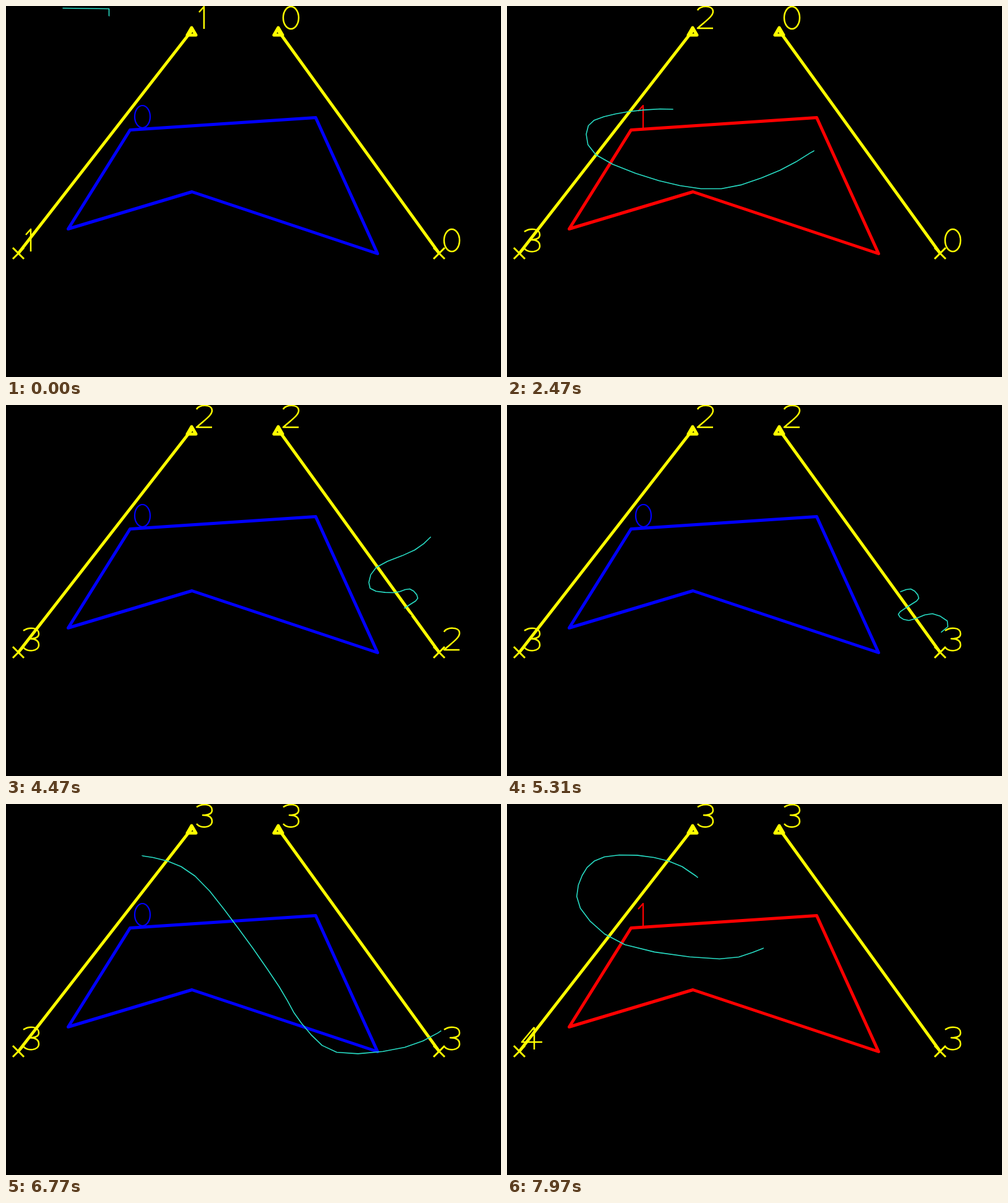
An HTML page with a canvas that plays this animation: 800 px wide and 600 px high, repeating every 8000 ms.

```html
<!DOCTYPE html>
<html lang="en">
<head>
<meta charset="utf-8">
<title>Zone and line counting</title>
<style>
  html, body { margin: 0; width: 100%; height: 100%; overflow: hidden; background: #000; }
  canvas { display: block; width: 800px; height: 600px; }
</style>
</head>
<body>
<canvas id="stage" width="800" height="600"></canvas>
<script>
const ctx = document.getElementById('stage').getContext('2d');
const LOOP = 8000, TRAIL = 1470, STEP = 70, BEAT = 210;
const YELLOW = '#ff0', TEAL = '#28dcc4';

// Stroked digits, relative to the marker they belong to.
const DIGITS = [
  'M8-21a12.5 18 0 1 1 25 0a12.5 18 0 1 1-25 0',
  'M12-30L20-39V-3',
  'M8-33C11-41 33-42 33-31C33-23 20-15 8-4H33',
  'M8-35C16-41 33-41 33-30Q33-22 18-22Q33-22 33-12C33-1 14 0 8-8',
  'M24-39V-3M24-39L4-15H37'
].map(d => new Path2D(d));

const zone = new Path2D('M200 200L500 180 600 400 300 300 100 360Z');
const arrow = new Path2D('M0 0V16L4 12 7 18 9 17 6 12H12Z');
const triangle = new Path2D('M0-5L-7 7H7Z');
const cross = new Path2D('M-9-9L9 9M9-9L-9 9');

const lines = [
  { from: [300, 40], to: [20, 400], initial: 1 },
  { from: [440, 40], to: [700, 400], initial: 0 }
];

// Key points of the walk, one per beat, joined by a smooth curve.
const walk = `166 17, 164 69, 246 104, 322 127, 333 167, 247 166, 175 174, 131 193, 143 240, 245 282,
  346 295, 441 265, 518 224, 636 199, 687 206, 660 234, 598 262, 588 296, 626 303, 652 297,
  665 312, 648 325, 632 338, 649 348, 687 337, 712 358, 644 393, 534 401, 477 354, 441 295,
  376 202, 305 116, 237 86, 157 85, 121 115, 118 168, 190 227, 343 250, 419 231, 495 205`
  .split(',').map(p => p.trim().split(' ').map(Number));

function position(t) {
  const i = Math.floor(t / BEAT), u = t / BEAT - i;
  const [a, b, c, d] = [-1, 0, 1, 2].map(k => walk[Math.min(Math.max(i + k, 0), walk.length - 1)]);
  return [0, 1].map(n => b[n] + u * ((c[n] - a[n]) +
    u * (2 * a[n] - 5 * b[n] + 4 * c[n] - d[n] + u * (3 * (b[n] - c[n]) + d[n] - a[n]))) / 2);
}

function isRightOf({ from, to }, [x, y]) {
  return x > from[0] + (to[0] - from[0]) * (y - from[1]) / (to[1] - from[1]);
}

for (const line of lines) {
  line.events = [];
  let side = isRightOf(line, position(0));
  for (let t = 10; t < LOOP; t += 10) {
    const now = isRightOf(line, position(t));
    if (now !== side) line.events.push({ t, right: now });
    side = now;
  }
}

function count(line, right, t) {
  return line.initial + line.events.filter(e => e.right === right && e.t <= t).length;
}

function stroke(path, color, width, [x, y] = [0, 0]) {
  ctx.save();
  ctx.translate(x, y);
  ctx.strokeStyle = color;
  ctx.lineWidth = width;
  ctx.stroke(path);
  ctx.restore();
}

function polyline(points) {
  const path = new Path2D();
  points.forEach(p => path.lineTo(...p));
  return path;
}

function drawLine(line, t) {
  const { from, to } = line;
  stroke(polyline([from, to]), YELLOW, 4.8);
  stroke(triangle, YELLOW, 5, from);
  stroke(cross, YELLOW, 3, to);
  stroke(DIGITS[count(line, false, t)], YELLOW, 2.5, from);
  stroke(DIGITS[count(line, true, t)], YELLOW, 2.5, to);
}

function drawTrail(t) {
  const start = Math.max(0, t - TRAIL);
  const points = [position(start)];
  if (t < TRAIL - STEP) points.unshift([166, 4]);
  if (t < TRAIL - 2 * STEP) points.unshift([91, 3]);
  for (let s = (Math.floor(start / STEP) + 1) * STEP; s < t; s += STEP) points.push(position(s));
  points.push(position(t));
  stroke(polyline(points), TEAL, 1.6, [.5, .5]);
}

function draw(t) {
  ctx.fillStyle = '#000';
  ctx.fillRect(0, 0, 800, 600);
  const head = position(t);
  const inside = ctx.isPointInPath(zone, ...head);
  const color = inside ? '#f00' : '#00f';
  ctx.lineJoin = 'round';
  stroke(zone, color, 5, [.5, .5]);
  stroke(DIGITS[Number(inside)], color, 2.2, [200, 200]);
  lines.forEach(line => drawLine(line, t));
  drawTrail(t);
  stroke(arrow, '#000', 2, head);
}

const began = performance.now();
function tick() {
  draw((performance.now() - began) % LOOP);
  requestAnimationFrame(tick);
}
tick();
</script>
</body>
</html>
```
